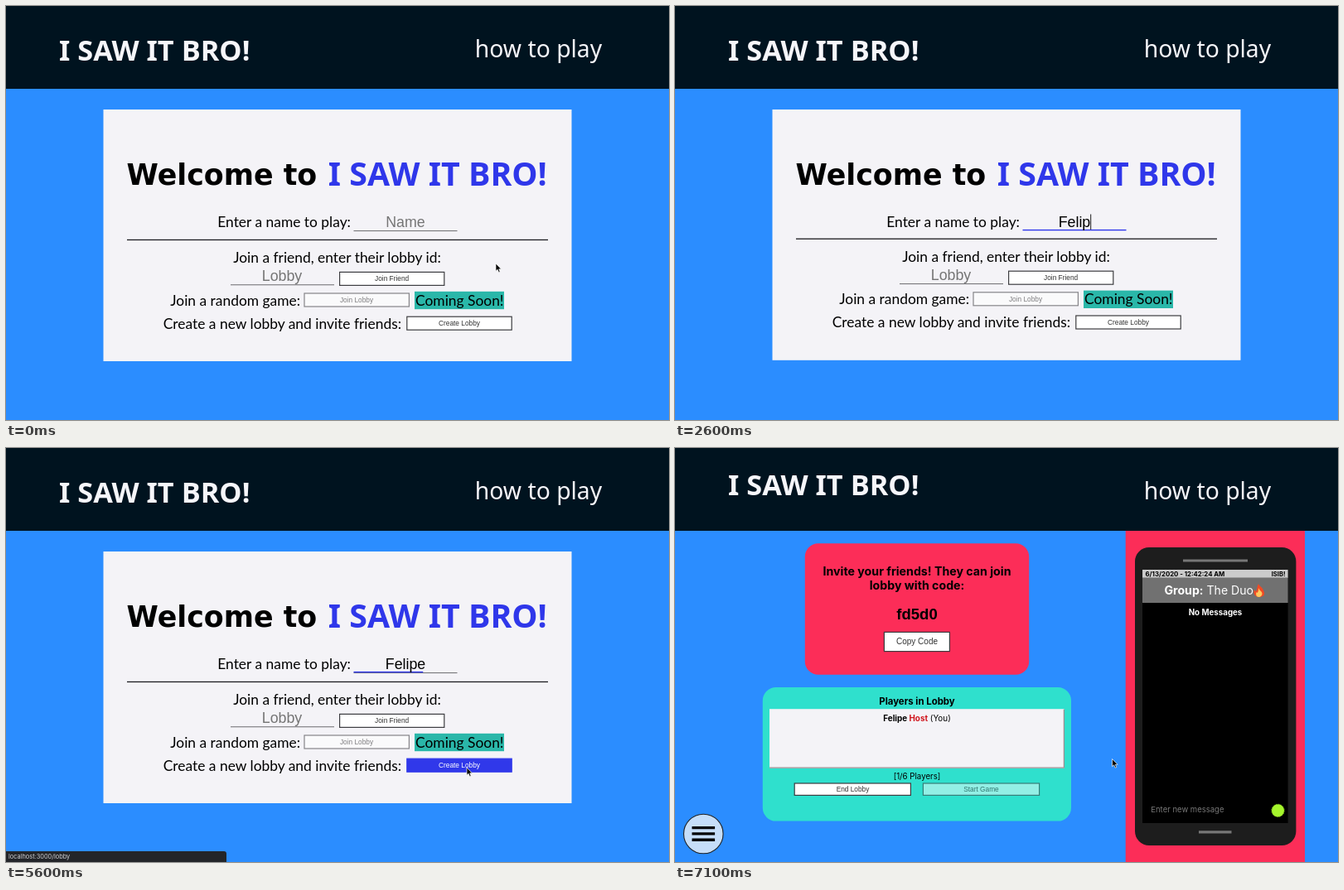
These frames come from a looping animation (800x500 px, 7.2 s). An HTML page:

```html
<!DOCTYPE html>
<html lang="en">
<head>
<meta charset="utf-8">
<title>Lobby</title>
<style>
html, body { margin: 0; width: 100%; height: 100%; overflow: hidden; background: #2b8dff; }
svg { display: block; width: 800px; height: 500px; }
.head { font-family: "Noto Sans", sans-serif; fill: #f6f6fa; }
.b { font-weight: 700; }
.mid { text-anchor: middle; }
.label { font: 17.4px Lato, sans-serif; }
.field { font: 17.8px "Liberation Sans", Arial, sans-serif; }
.btn { font: 8.3px "Liberation Sans", Arial, sans-serif; text-anchor: middle; fill: #333; }
.ui { font-family: Inter, sans-serif; }
.box { fill: #fff; stroke: #3c3c40; stroke-width: 1.2; }
.hint { fill: #757575; }
.line { fill: #77777a; }
.off { opacity: .6; }
</style>
</head>
<body>
<svg viewBox="0 0 800 500">
  <rect width="800" height="500" fill="#2b8dff"/>
  <rect width="800" height="100" fill="#00131f"/>
  <text id="logo" class="head b" x="64" font-size="34.3">I SAW IT BRO!</text>
  <text class="head" x="565.8" y="62" font-size="28.3">how to play</text>

  <g id="home">
    <rect id="panel" x="117.5" y="125" width="565" height="304" fill="#f4f3f7"/>
    <text x="145.5" y="216" font-family="DejaVu Sans, sans-serif" font-weight="700" font-size="34.8">Welcome to</text>
    <text class="head b" x="388.8" y="216.5" font-size="39.3" style="fill:#2f37ea">I SAW IT BRO!</text>
    <text class="label" x="255.3" y="267">Enter a name to play:</text>
    <rect id="nameLine" class="line" x="419.5" y="271" width="125" height="1.1"/>
    <rect id="nameFill" x="419.5" y="269.9" height="1.4" fill="#2f37ea"/>
    <text id="name" class="field mid" x="482" y="267"></text>
    <rect id="caret" y="251.5" width=".9" height="18.5"/>
    <g id="rows">
      <rect x="146" y="281.8" width="508" height="1.3" fill="#1c1c20"/>
      <text class="label mid" x="399.5" y="310">Join a friend, enter their lobby id:</text>
      <text class="field mid hint" x="333" y="332">Lobby</text>
      <rect class="line" x="271" y="336.2" width="125" height="1.1"/>
      <rect class="box" x="402.6" y="321.4" width="126.2" height="16"/>
      <text class="btn" x="465.6" y="332">Join Friend</text>
      <text class="label" x="198.3" y="361.5">Join a random game:</text>
      <g class="off">
        <rect class="box" x="360" y="347" width="126.4" height="16"/>
        <text class="btn" x="423" y="358">Join Lobby</text>
      </g>
      <rect x="493" y="344.8" width="108" height="21.4" fill="#2ab7a9"/>
      <text class="label mid" x="547.3" y="361.5">Coming Soon!</text>
      <text class="label" x="189.8" y="389.7">Create a new lobby and invite friends:</text>
      <rect id="create" class="box" x="483.8" y="375.2" width="126.4" height="16"/>
      <text id="createText" class="btn" x="547" y="386.3">Create Lobby</text>
    </g>
    <g id="status">
      <path d="M0 487H263q3 0 3 3V500H0z" fill="#232529"/>
      <text class="ui" x="3" y="496.2" font-size="7.4" fill="#cfd0d3">localhost:3000/lobby</text>
    </g>
  </g>

  <g id="lobby" class="ui">
    <rect x="156.8" y="115.3" width="270.4" height="158.4" rx="16" fill="#fc2d58"/>
    <g class="b mid">
      <text x="292" y="153.7" font-size="14.2">Invite your friends! They can join</text>
      <text x="292" y="171.3" font-size="14.2">lobby with code:</text>
      <text x="292" y="206.5" font-size="18.5" font-family="Liberation Sans, Arial, sans-serif">fd5d0</text>
    </g>
    <rect class="box" x="252.4" y="222.4" width="79" height="23.2"/>
    <text class="btn" x="292" y="237.3" style="font-size:10px">Copy Code</text>

    <rect x="105.8" y="289" width="372.2" height="161.6" rx="16" fill="#2fe0cd"/>
    <text class="b mid" x="292" y="310" font-size="11.4">Players in Lobby</text>
    <rect x="114" y="315.2" width="356" height="71.6" fill="#f4f3f7"/>
    <path d="M469.4 315.5V386.2H114" fill="none" stroke="#988f92" stroke-width="1.3"/>
    <text class="mid" x="292" y="330" font-size="9.9"><tspan class="b">Felipe <tspan fill="#d0141c">Host</tspan></tspan> (You)</text>
    <text class="mid" x="292" y="399.5" font-size="9.7">[1/6 Players]</text>
    <rect class="box" x="144.2" y="405" width="140.2" height="14.4"/>
    <text class="btn" x="214.5" y="415.3">End Lobby</text>
    <g class="off">
      <rect class="box" x="299.4" y="405" width="140.2" height="14.4" style="fill-opacity:.8"/>
      <text class="btn" x="369.5" y="415.3">Start Game</text>
    </g>

    <circle cx="34.3" cy="466" r="23.8" fill="#c6def9" stroke="#222" stroke-width="1.1"/>
    <path d="M20.5 458.6h27.6M20.5 465.9h27.6M20.5 473.2h27.6" stroke="#000" stroke-width="3.4"/>

    <rect x="543.7" y="100" width="216.3" height="400" fill="#fc2d58"/>
    <rect x="555" y="120" width="194.4" height="360" rx="17" fill="#1d1d1d"/>
    <path d="M613 136H691M632 463.8H671.5" stroke="#777" stroke-width="3.2"/>
    <rect x="564" y="147" width="175.6" height="306"/>
    <rect x="564" y="147" width="175.6" height="10" fill="#cbcbcb"/>
    <rect x="564" y="156.5" width="175.6" height="30.5" fill="#717171"/>
    <text id="clock" class="b" x="567.5" y="154.5" font-size="7.8">6/13/2020 - 12:42:24 AM</text>
    <text class="b" x="736.5" y="154.5" font-size="7.6" text-anchor="end">ISIB!</text>
    <text x="590.5" y="177.3" font-size="14.1" fill="#fff"><tspan class="b">Group:</tspan> The Duo</text>
    <path d="M704 164c1 3 5 4 6 8 3 6-1 8-5 8-5 0-8-4-6-9 1 1 1 2 2 2 2-3 1-6 3-9z" fill="#ef4a25"/>
    <path d="M704.5 169c0 3 4 4 4 7 0 2-2 4-4 4-3 0-4-3-3-6l1 1c2-2 1-4 2-6z" fill="#ffc95c"/>
    <text class="b mid" x="652" y="202.3" font-size="9.75" fill="#fff">No Messages</text>
    <text x="574.3" y="440.4" font-size="9.5" fill="#777">Enter new message</text>
    <circle cx="727.5" cy="437.8" r="7.6" fill="#a5f52c" stroke="#83c51f" stroke-dasharray="1.6 1.4"/>
  </g>

  <g id="pointer" stroke-linejoin="round">
    <path id="arrow" d="M0 0V9.2L2.1 7.3 3.6 10.7 5.2 10 3.8 6.8H6.6z" fill="#000" stroke="#fff" stroke-width=".7"/>
    <path id="beam" d="M-2-6Q0-6 0-4.5Q0-6 2-6M0-5V5M-2 6Q0 6 0 4.5Q0 6 2 6M-1.3 1.8H1.3" fill="none" stroke="#222" stroke-width=".9"/>
    <path id="hand" d="M-1 .6Q0-.8 1 .6V4Q2 3 3 4Q4 3.4 4.8 4.6Q6 4.2 6.2 5.6V8Q6 10 4.6 11.5H-.6Q-1.5 9.5-4 7Q-4 5.6-2.4 6.2L-1 7.4z" fill="#fff" stroke="#222" stroke-width=".9"/>
  </g>
</svg>
<script>
const LOOP = 7200, HOVER = 805, BLUR = 5535, SWITCH = 5800, CLOCK = 6750;
const NAME = "Felipe", KEYS = [1700, 1950, 2150, 2350, 2550, 2750];
const PATH = [[0, 591, 311], [800, 486, 264], [900, 482, 259], [3400, 482, 259], [4300, 562, 381],
  [4700, 560, 375], [5500, 556, 386], [6500, 555.5, 386], [7100, 527.5, 375.5]];

const $ = id => document.getElementById(id);
const set = (id, key, value) => $(id).setAttribute(key, value);
const show = (id, on) => { $(id).style.display = on ? "" : "none"; };
const clamp = v => Math.min(1, Math.max(0, v));
const ramp = (t, start, length) => clamp((t - start) / length);
const mix = (a, b, k) => a + (b - a) * k;

// CSS "ease": cubic-bezier(.25, .1, .25, 1)
function ease(x) {
  const bez = (a, b, s) => 3 * a * s * (1 - s) ** 2 + 3 * b * s * s * (1 - s) + s ** 3;
  let lo = 0, hi = 1;
  for (let i = 0; i < 20; i++) {
    const s = (lo + hi) / 2;
    if (bez(.25, .25, s) < x) lo = s; else hi = s;
  }
  return bez(.1, 1, lo);
}

function bounce(t) {
  const p = ((t + (t < 5700 ? 70 : -30)) % 3000) / 1500;
  return 10 * (p < 1 ? ease(p) : 1 - ease(p - 1));
}

function pointerAt(t) {
  let i = 0;
  while (i < PATH.length - 2 && t >= PATH[i + 1][0]) i++;
  const [t0, x0, y0] = PATH[i], [t1, x1, y1] = PATH[i + 1];
  const k = ramp(t, t0, t1 - t0), s = k * k * (3 - 2 * k);
  return [mix(x0, x1, s), mix(y0, y1, s)];
}

function drawName(t) {
  const active = t >= HOVER && t < BLUR;
  const lift = active ? 1.2 : 0;
  set("rows", "transform", `translate(0 ${-lift})`);
  set("panel", "height", 304 - lift);
  show("nameLine", !active);
  set("nameFill", "width", 125 * (t < BLUR ? ramp(t, HOVER, 190) : 1 - ramp(t, BLUR, 200)));

  const count = KEYS.filter(k => t >= k).length;
  $("name").textContent = count ? NAME.slice(0, count) : "Name";
  set("name", "class", count ? "field mid" : "field mid hint");
  const since = t - (count ? KEYS[count - 1] : 1200);
  const half = count ? $("name").getComputedTextLength() / 2 : 0;
  set("caret", "x", 482 + half);
  show("caret", since >= 0 && t < BLUR && since % 1000 < 500);
}

function drawCreate(t) {
  const k = ramp(t, 4750, 250);
  const blend = (a, b) => `rgb(${a.map((v, i) => Math.round(mix(v, b[i], k)))})`;
  $("create").style.fill = blend([255, 255, 255], [48, 56, 234]);
  $("create").style.stroke = blend([60, 60, 64], [48, 56, 234]);
  $("createText").style.fill = blend([51, 51, 51], [255, 255, 255]);
  $("status").style.opacity = ramp(t, 4950, 150);
}

function drawPointer(t) {
  const [x, y] = pointerAt(t);
  const beam = x > 419 && x < 545 && y > 250 && y < 272;
  const hand = t < BLUR && x > 483 && x < 611 && y > 373 && y < 392;
  set("pointer", "transform", `translate(${x} ${y})`);
  show("pointer", t < KEYS[0] || t >= 3350);
  show("beam", beam);
  show("hand", hand);
  show("arrow", !beam && !hand);
}

function frame(now) {
  const t = now % LOOP;
  set("logo", "y", 66.7 - bounce(t));
  show("home", t < SWITCH);
  show("lobby", t >= SWITCH);
  show("clock", t >= CLOCK);
  if (t < SWITCH) {
    drawName(t);
    drawCreate(t);
  }
  drawPointer(t);
  requestAnimationFrame(frame);
}
frame(0);
</script>
</body>
</html>
```
